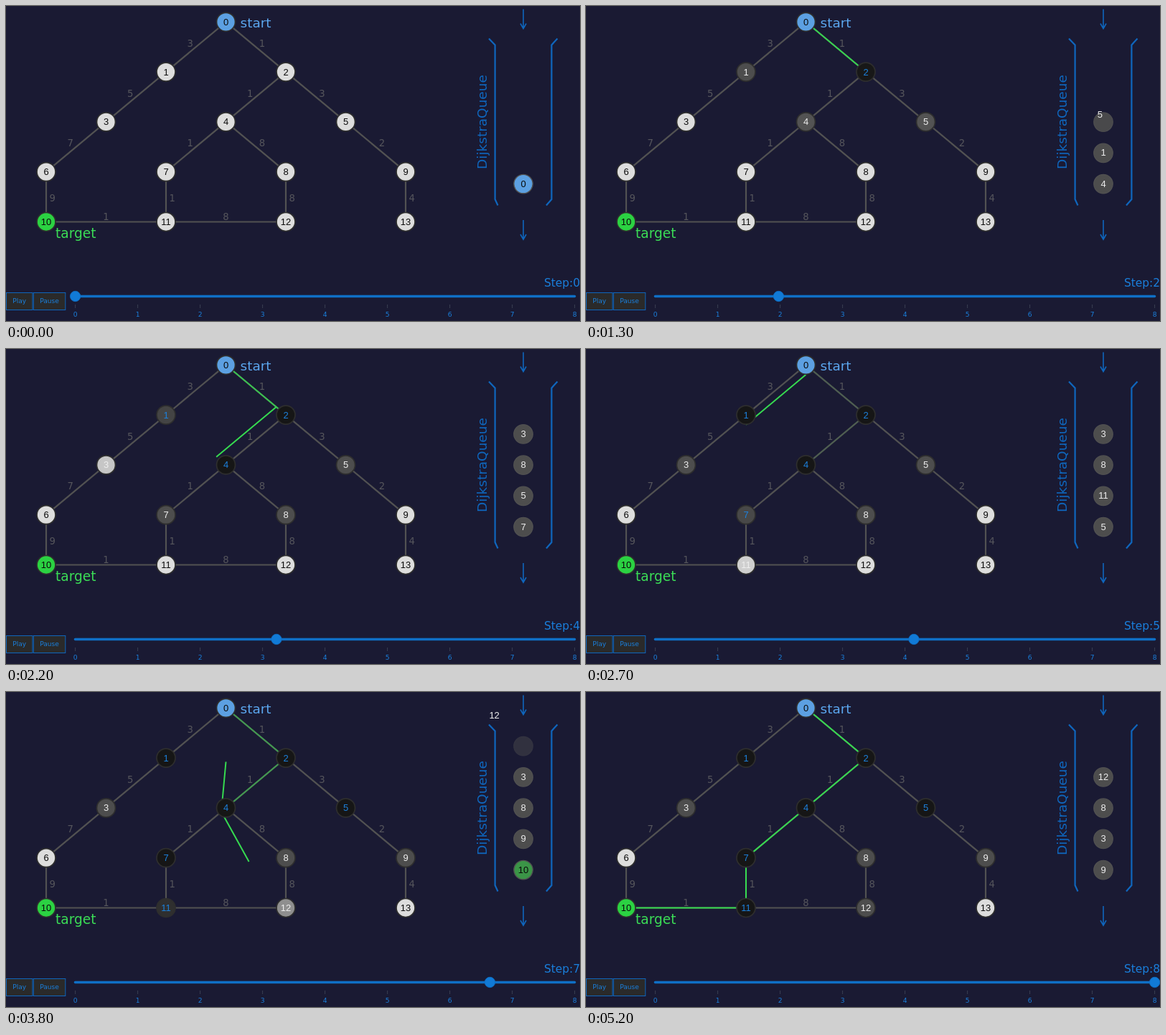
These frames come from a looping animation (800x440 px, 5300 ms). An HTML page:

```html
<!DOCTYPE html>
<html lang="en">
<head>
<meta charset="utf-8">
<title>Shortest path search</title>
<style>
  html, body { margin: 0; width: 100%; height: 100%; overflow: hidden; background: #1a1a33; }
  svg { display: block; width: 800px; height: 440px; }
  text { font-family: "DejaVu Sans", sans-serif; }
  .num { font-family: "Liberation Sans", Arial, sans-serif; font-size: 13px; text-anchor: middle; }
  .mid { text-anchor: middle; }
</style>
</head>
<body>
<svg id="stage" viewBox="0 0 800 440"></svg>
<script>
const LOOP = 5300, TICK = 100, MOVE = 304;
const PATH_LAG = 12, TEXT_LAG = 20;
const STARTS = [518, 1052, 1568, 2084, 2600, 3116, 3632, 4148];

const WHITE = [221, 221, 221], GRAY = [77, 77, 77], BLACK = [22, 22, 22];
const BLUE = [92, 160, 226], GREEN = [43, 210, 66];
const LINE = '#0f66bd', ACCENT = '#1a7fdc', EDGE = '#525252';

// column and row of every node
const GRID = [[3, 0], [2, 1], [4, 1], [1, 2], [3, 2], [5, 2], [0, 3],
              [2, 3], [4, 3], [6, 3], [0, 4], [2, 4], [4, 4], [6, 4]];
const POS = GRID.map(([c, r]) => [56 + 83.5 * c, 22.3 + 69.8 * r]);
// from, to, weight
const EDGES = [[0, 1, 3], [0, 2, 1], [1, 3, 5], [2, 4, 1], [2, 5, 3], [3, 6, 7], [4, 7, 1], [4, 8, 8],
               [5, 9, 2], [6, 10, 9], [7, 11, 1], [8, 12, 8], [9, 13, 4], [10, 11, 1], [11, 12, 8]];
const POPPED = [0, 2, 4, 1, 7, 5, 11, 10];
const PARENT = { 1: 0, 2: 0, 4: 2, 5: 2, 7: 4, 11: 7, 10: 11 };
const QUEUES = ['0', '2 1', '4 1 5', '1 5 7 8', '7 5 8 3', '5 11 8 3',
                '11 9 8 3', '10 9 8 3 12', '9 3 8 12'].map(s => s.split(' ').map(Number));

const svg = document.getElementById('stage');
function add(tag, attrs, text) {
  const el = document.createElementNS('http://www.w3.org/2000/svg', tag);
  set(el, attrs);
  if (text !== undefined) el.textContent = text;
  svg.appendChild(el);
  return el;
}
function set(el, attrs) {
  for (const key in attrs) el.setAttribute(key, attrs[key]);
}
function label(x, y, size, fill, text, attrs) {
  return add('text', { x, y, 'font-size': size, fill, ...attrs }, text);
}
function stroke(d, color, width) {
  return add('path', { d, fill: 'none', stroke: color, 'stroke-width': width });
}

const clamp = v => Math.max(0, Math.min(1, v));
const ease = u => u < 0.5 ? 4 * u ** 3 : 1 - 4 * (1 - u) ** 3;
const lerp = (a, b, p) => a + (b - a) * p;
const mix = (a, b, p) => `rgb(${a.map((v, i) => Math.round(lerp(v, b[i], p)))})`;

function nodeFill(n, step) {
  if (n === 0) return BLUE;
  if (n === 10) return GREEN;
  if (POPPED.indexOf(n) >= 0 && POPPED.indexOf(n) < step) return BLACK;
  return QUEUES.slice(0, step + 1).some(q => q.includes(n)) ? GRAY : WHITE;
}
const queueFill = n => n === 0 ? BLUE : n === 10 ? GREEN : GRAY;
const textFill = fill => fill === BLACK ? '#1c80dc' : fill === GRAY ? '#eeeeee' : '#0a0a0a';

// path segments, listed from the current node back to the start
function segments(step) {
  const list = [];
  for (let n = POPPED[step - 1]; n; n = PARENT[n]) list.push([...POS[n], ...POS[PARENT[n]]]);
  return list;
}

// graph
for (const [a, b] of EDGES) stroke(`M${POS[a]}L${POS[b]}`, EDGE, 2.2);
for (const [a, b, weight] of EDGES) {
  const [ax, ay] = POS[a], [bx, by] = POS[b];
  const flat = ay === by, upright = ax === bx;
  const dx = flat ? 0 : bx < ax ? -8 : 8.7;
  const dy = flat ? -7.5 : upright ? 1.5 : -5.3;
  label((ax + bx) / 2 + dx, (ay + by) / 2 + dy + 4.8, 13.2, '#56565c', weight, { class: 'mid' });
}
const pathLines = Array.from({ length: 5 }, () => add('line', { stroke: '#36db50', 'stroke-width': 2 }));
const nodes = POS.map(([cx, cy], n) => ({
  dot: add('circle', { cx, cy, r: 13, stroke: '#2e2e2e', 'stroke-width': 1.7 }),
  text: add('text', { class: 'num', x: cx, y: cy + 4.5 }, n)
}));
label(326.5, 30, 18.5, '#5ba6ee', 'start');
label(69, 324, 18.6, '#3bdc56', 'target');

// queue
stroke('M673 45.5L681.6 54.5V270L685.5 278.5', LINE, 2.2);
stroke('M768.5 45.5L760.4 54.5V270L753 278.5', LINE, 2.2);
for (const y of [4.5, 299]) stroke(`M721 ${y}v27m-4 -7l4 7.2l4 -7.2`, LINE, 1.6);
label(0, 0, 18.5, LINE, 'DijkstraQueue', { transform: 'translate(669.5 228) rotate(-90)' });
const slots = Array.from({ length: 5 }, (_, i) => {
  const y = 248.6 - 43.25 * i;
  return {
    y: y + 4,
    dot: add('circle', { cx: 721, cy: y, r: 13.2, stroke: '#515151', 'stroke-width': 1.4 }),
    text: add('text', { class: 'num' })
  };
});

// controls
for (const [x, w, name] of [[0.5, 36.5, 'Play'], [38.3, 44.5, 'Pause']]) {
  add('rect', { x, y: 400.5, width: w, height: 24, fill: '#2a2a2a', stroke: LINE, 'stroke-width': 1 });
  label(x + w / 2, 415.3, 9.1, ACCENT, name, { class: 'mid' });
}
const railX = v => 96.6 + 87 * v;
for (let i = 0; i <= 8; i++) {
  stroke(`M${railX(i)} 417v5`, '#3a3f52', 1);
  label(railX(i), 434, 9.2, ACCENT, i, { class: 'mid' });
}
add('line', { x1: 96.5, x2: 792.5, y1: 405.5, y2: 405.5, stroke: '#0f6fc6',
              'stroke-width': 3.6, 'stroke-linecap': 'round' });
const knob = add('circle', { cy: 405.5, r: 7.2, fill: '#117ad6', stroke: '#0f6fc6', 'stroke-width': 0.8 });
const stepLabel = label(800, 391.5, 15.4, ACCENT, '', { 'text-anchor': 'end' });

function render(t) {
  const step = STARTS.filter(s => s <= t).length;
  const prev = Math.max(0, step - 1);
  const progress = lag => step ? ease(clamp((t - STARTS[step - 1] - lag) / MOVE)) : 1;
  const p = progress(PATH_LAG), q = progress(TEXT_LAG);

  knob.setAttribute('cx', railX(lerp(prev, step, progress(0))));
  stepLabel.textContent = 'Step:' + step;

  const from = segments(prev), to = segments(step);
  pathLines.forEach((line, i) => {
    const a = from[i] || to[i], b = to[i] || from[i];
    if (!a) return set(line, { opacity: 0 });
    const [x1, y1, x2, y2] = a.map((v, j) => lerp(v, b[j], p));
    set(line, { x1, y1, x2, y2, opacity: lerp(from[i] ? 1 : 0, to[i] ? 1 : 0, p) });
  });

  nodes.forEach(({ dot, text }, n) => {
    const fill = nodeFill(n, step);
    dot.setAttribute('fill', mix(nodeFill(n, prev), fill, p));
    text.setAttribute('fill', textFill(fill));
  });

  // a new entry's number flies in from the corner of the plot
  slots.forEach(({ y, dot, text }, i) => {
    const old = QUEUES[prev][i], now = QUEUES[step][i];
    const had = old !== undefined, has = now !== undefined;
    set(dot, {
      opacity: lerp(had ? 1 : 0, has ? 1 : 0, q),
      fill: mix(queueFill(had ? old : now), queueFill(has ? now : old), p)
    });
    const fly = had ? 1 : q;
    set(text, { x: lerp(646, 721, fly), y: lerp(0, y, fly), fill: has ? textFill(queueFill(now)) : 'none' });
    text.textContent = has ? now : '';
  });
}

const origin = performance.now();
function tick() {
  const t = (performance.now() - origin) % LOOP;
  render(Math.floor(t / TICK) * TICK);
  requestAnimationFrame(tick);
}
render(0);
requestAnimationFrame(tick);
</script>
</body>
</html>
```
